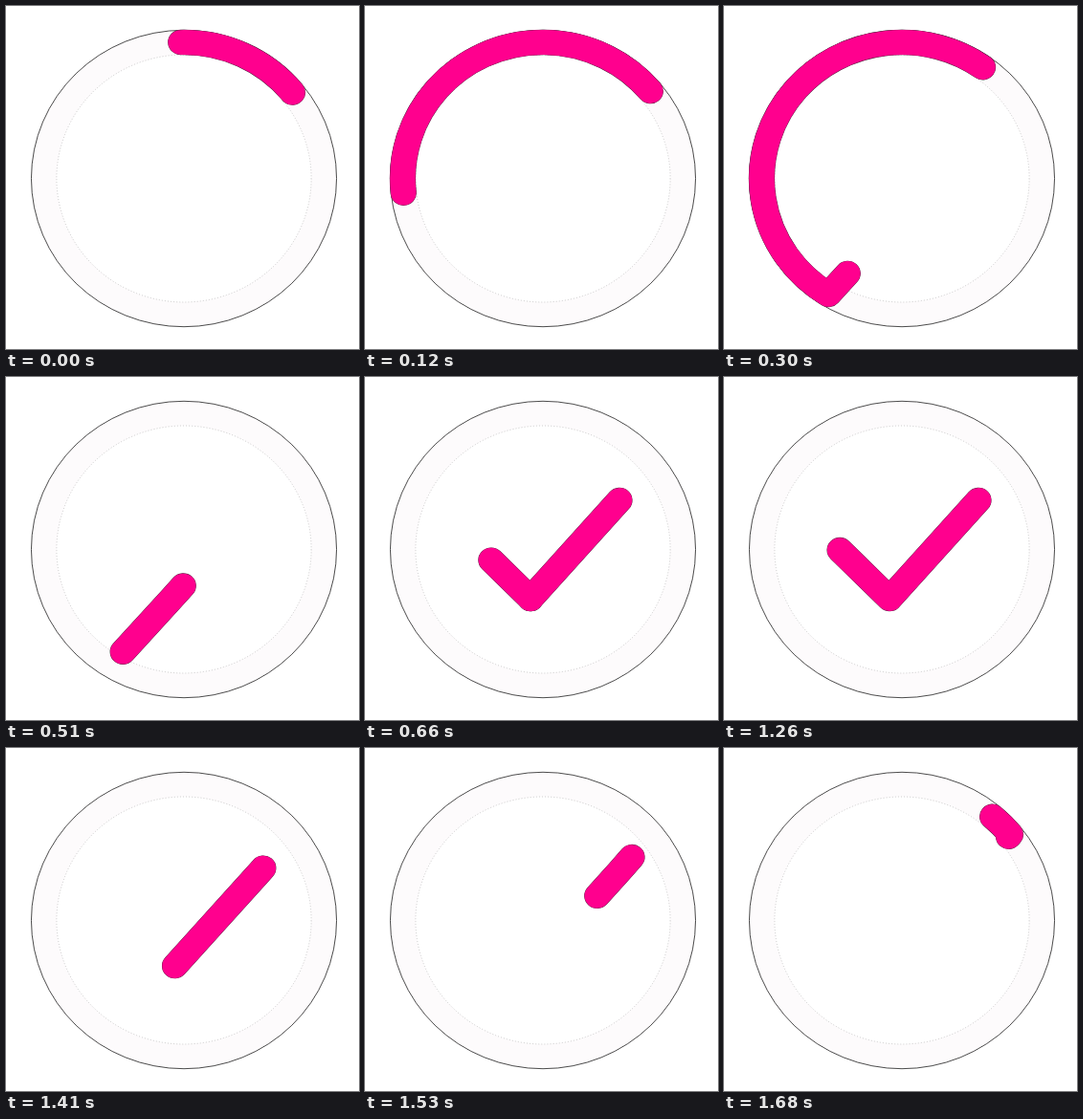
Write an HTML page that moves like this. It is 369 by 359 pixels and loops after 1.71 s.

```html
<!DOCTYPE html>
<html lang="en">
<head>
<meta charset="utf-8">
<title>Check mark loader</title>
<style>
  /* Distances along the track, in track units */
  @property --head  { syntax: "<number>"; inherits: true; initial-value: 0; }
  @property --tail  { syntax: "<number>"; inherits: true; initial-value: 0; }
  @property --arm   { syntax: "<number>"; inherits: true; initial-value: 0; }
  @property --shown { syntax: "<number>"; inherits: true; initial-value: 0; }

  html, body { margin: 0; width: 100%; height: 100%; overflow: hidden; background: #fff; }

  svg {
    display: block;
    animation: head 1710ms linear infinite, tail 1710ms linear infinite, arm 1710ms linear infinite;
  }

  .line { fill: none; stroke-linecap: round; stroke-linejoin: round; }
  .edge { stroke: #54203e; stroke-width: 26.5px; }
  .ink  { stroke: #ff008e; stroke-width: 25.8px; }

  #track {
    stroke-dasharray: calc((var(--head) - var(--tail)) * 1px) 2000px;
    stroke-dashoffset: calc(var(--tail) * -1px);
  }
  #arm {
    stroke-dasharray: calc(var(--arm) * 1px) 2000px;
    opacity: var(--shown);
  }

  @keyframes head {
    0%      { --head: 387.5; animation-timing-function: cubic-bezier(.3, .6, .7, .93); }
    17.544% { --head: 785; }
    29.825% { --head: 867;   animation-timing-function: cubic-bezier(.3, .15, .6, 1); }
    37.427% { --head: 986.6; animation-timing-function: step-end; }
    52.632% { --head: 210.3; }
    78.947% { --head: 210.3; animation-timing-function: ease-in; }
    82.456% { --head: 214.5; animation-timing-function: cubic-bezier(.5, .2, .8, .4); }
    98.246% { --head: 283.6; }
    100%    { --head: 387.5; }
  }

  @keyframes tail {
    0%      { --tail: 260.7; animation-timing-function: cubic-bezier(.6, 0, .8, .2); }
    17.544% { --tail: 299;   animation-timing-function: cubic-bezier(.4, .08, .65, .85); }
    29.825% { --tail: 774;   animation-timing-function: cubic-bezier(.3, .4, .6, 1); }
    35.088% { --tail: 849.6; animation-timing-function: step-end; }
    52.632% { --tail: 0; }
    72.515% { --tail: 0;     animation-timing-function: cubic-bezier(.333, 0, .667, 1); }
    100%    { --tail: 260.7; }
  }

  @keyframes arm {
    0%      { --arm: 0;    --shown: 0; animation-timing-function: step-end; }
    32.749% { --arm: 0;    --shown: 1; }
    38.596% { --arm: 56.5; --shown: 1; animation-timing-function: ease-out; }
    43.86%  { --arm: 73.3; --shown: 1; animation-timing-function: step-end; }
    52.632% { --arm: 0;    --shown: 0; }
    100%    { --arm: 0;    --shown: 0; }
  }
</style>
</head>
<body>
<svg width="369" height="359" viewBox="0 0 369 359">
  <defs>
    <g id="mark">
      <!-- short arm, long arm, round the ring, back up the long arm -->
      <path id="track" d="M-64.2 -.5 L-12.6 51.5 L77.8 -51.5 L110.4 -90
        A142.5 142.5 0 1 0 -74.7 121.4 L-12.6 51.5 L77.8 -51.5"/>
      <path id="arm" d="M-12.6 51.5 L-64.2 -.5"/>
    </g>
  </defs>
  <g transform="translate(186 180.5) scale(1.028 1)" fill="none">
    <circle r="142.5" stroke="#fdfbfc" stroke-width="26"/>
    <circle r="155.2" stroke="#222" stroke-width=".8"/>
    <circle r="129.5" stroke="#aaa" stroke-width=".6" stroke-dasharray="1 2"/>
    <use href="#mark" class="line edge"/>
    <use href="#mark" class="line ink"/>
  </g>
</svg>
</body>
</html>
```
